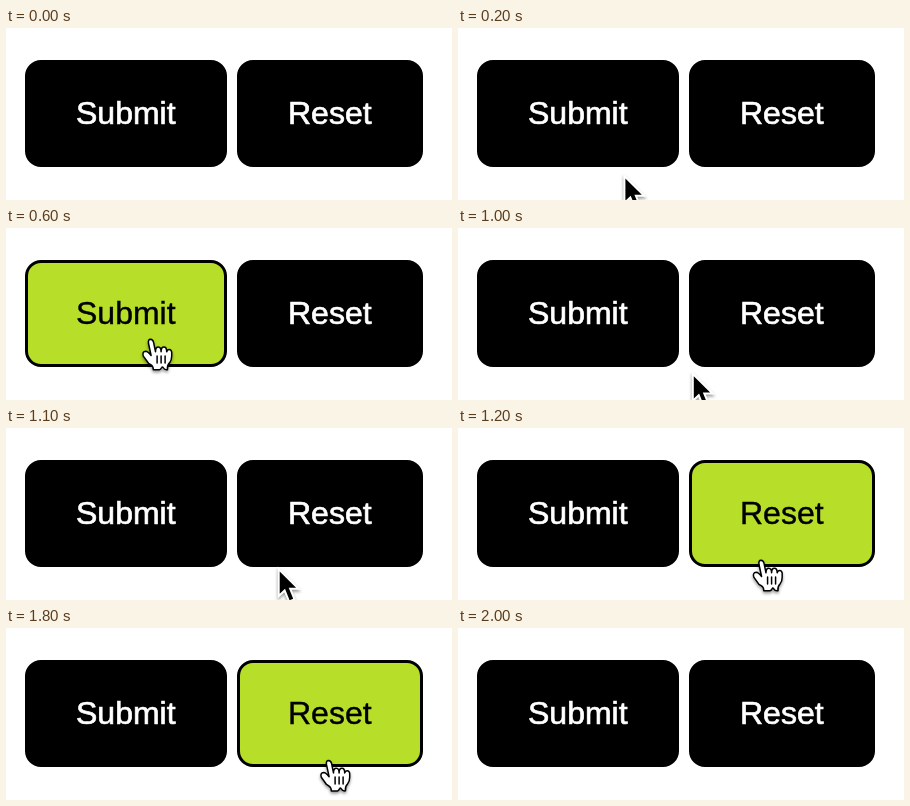
Animation, 446 px wide and 172 px high, one loop 2.4 s. Source, as an HTML page:

```html
<!DOCTYPE html>
<html lang="en">
<head>
<meta charset="utf-8">
<title>Button hover</title>
<style>
html, body { margin: 0; width: 100%; height: 100%; overflow: hidden; background: #fff; }
svg { display: block; }
text { font: 32px "Liberation Sans", Arial, sans-serif; fill: #fff; stroke: #fff; stroke-width: .7; }
rect { fill: #000; stroke: #000; stroke-width: 3; }
.hover rect { fill: #b7de28; }
.hover text { fill: #000; stroke: #000; stroke-width: .4; }
.cursor { filter: drop-shadow(0 2px 1.5px rgba(0, 0, 0, .4)); }
</style>
</head>
<body>
<svg width="446" height="172" viewBox="0 0 446 172">
  <g id="submit">
    <rect x="20.5" y="33.5" width="199" height="104" rx="14.5"/>
    <text x="70" y="96">Submit</text>
  </g>
  <g id="reset">
    <rect x="232.5" y="33.5" width="183" height="104" rx="14.5"/>
    <text x="282" y="96">Reset</text>
  </g>
  <g id="arrow">
    <path class="cursor" stroke="#fff" stroke-width="4" stroke-miterlimit="8" paint-order="stroke"
      d="M0 0V22.4L5.3 17.3L9.9 28.7L13.5 27.2L9 16.4H16.4Z"/>
  </g>
  <g id="hand">
    <g class="cursor">
      <g transform="scale(2) translate(-12.2 -8.4)" fill="#fff" stroke="#000" stroke-width=".75" stroke-linejoin="round" stroke-linecap="round">
        <path d="M11.3 20.4L8.7 16.8Q8 14.6 9.9 14.4Q11 14.5 12.6 16.5
          L11.3 10.5Q11 8.4 12.3 8.4Q13.5 8.5 13.8 9.8L14.8 14.6
          q0-2.3 1.4-2.3t1.4 2.3q0-2.3 1.4-2.3t1.4 2.3q.3-1.2 1.3-1.1t1.2 1.3
          V16.8Q22.9 19 21.8 20.2Q20.5 21.5 20.8 23.6Q19.3 23.8 18.6 22.5
          Q18.2 21.9 17.9 22.5Q17.3 23.6 16.8 23.6H13.7Q13.8 22 12.4 21.1Z"/>
        <path d="M15.6 16.7v3.5m2-3.5v3.5m2-3.5v3.5"/>
      </g>
    </g>
  </g>
</svg>
<script>
const LOOP = 2400, STEP = 100;
const el = id => document.getElementById(id);
const arrow = el("arrow"), hand = el("hand");
const buttons = [
  { node: el("submit"), left: 19, right: 221 },
  { node: el("reset"), left: 231, right: 417 }
];

const below = { x: 167.4, y: 150.4 };
const onSubmit = { x: 144.3, y: 111.3 };
const onReset = { x: 327.3, y: 120.3 };
const away = { x: 307.3, y: 169 };

const quadIn = u => u * u;
const quadOut = u => 1 - (1 - u) ** 2;
const sineOut = u => Math.sin(u * Math.PI / 2);

// Eased move from a to b, sagging by dip in the middle.
function glide(a, b, u, ease, dip = 0) {
  const k = ease(Math.min(1, Math.max(0, u)));
  return {
    x: a.x + (b.x - a.x) * k,
    y: a.y + (b.y - a.y) * k + dip * Math.sin(Math.PI * k)
  };
}

// Tip of the pointer, or null while it is off stage.
function pointer(ms) {
  if (ms < 200 || ms >= 2000) return null;
  if (ms < 800) return glide(below, onSubmit, (ms - 200) / 400, quadOut);
  if (ms < 1600) return glide(onSubmit, onReset, (ms - 800) / 600, sineOut, 32.4);
  return glide(onReset, away, (ms - 1600) / 400, quadIn);
}

function place(node, p) {
  node.setAttribute("visibility", p ? "visible" : "hidden");
  if (p) node.setAttribute("transform", `translate(${p.x} ${p.y})`);
}

function draw(ms) {
  const p = pointer(Math.floor(ms / STEP) * STEP);
  const hit = b => p && p.x > b.left && p.x < b.right && p.y > 32 && p.y < 139;
  const target = buttons.find(hit);
  for (const b of buttons) b.node.classList.toggle("hover", b === target);
  place(hand, target ? p : null);
  place(arrow, target ? null : p);
}

const start = performance.now();
function tick() {
  draw((performance.now() - start) % LOOP);
  requestAnimationFrame(tick);
}
tick();
</script>
</body>
</html>
```
